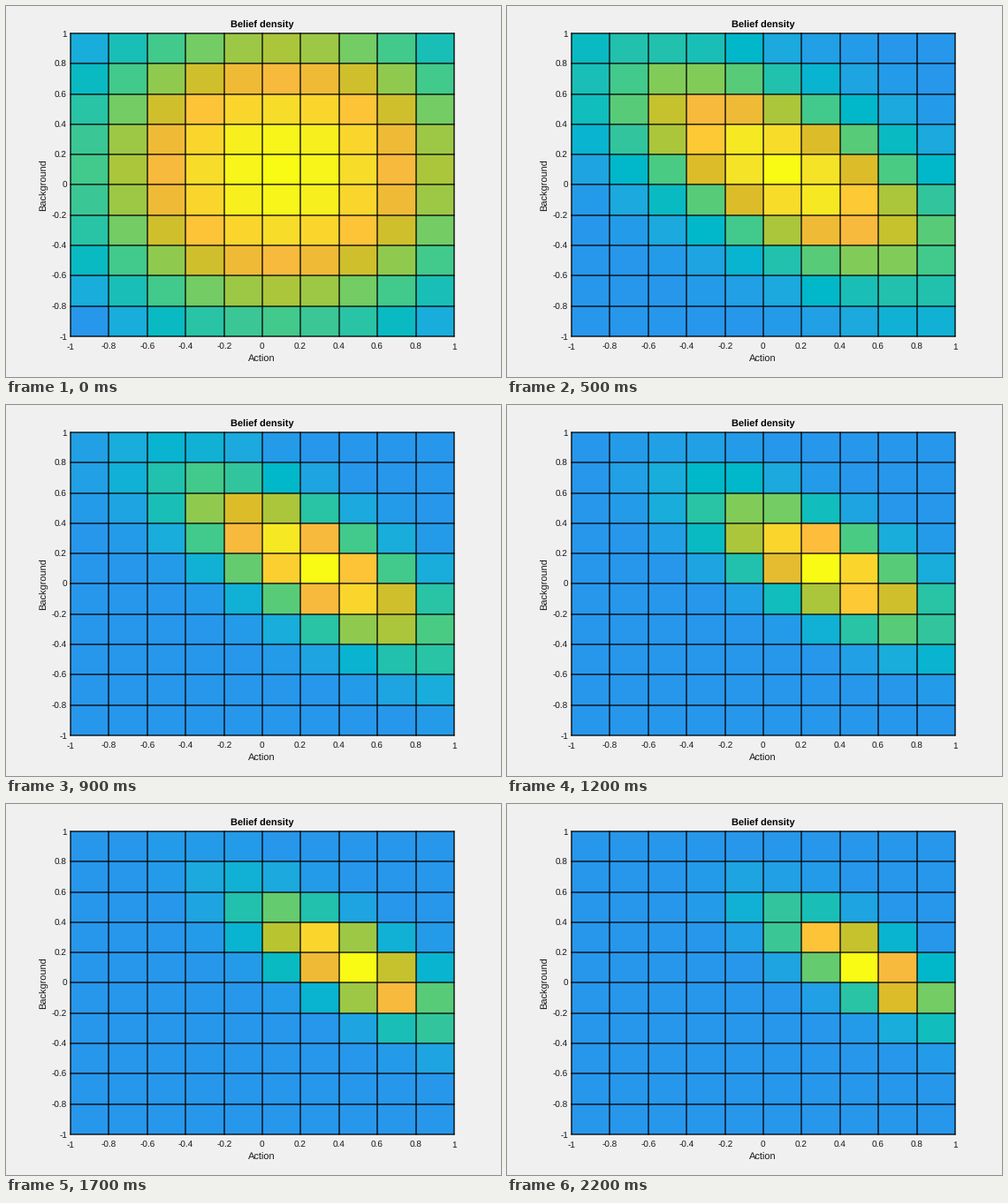
These frames come from a looping animation (560 px wide and 420 px high, 2.3 s). A matplotlib script:

```python
import numpy as np
import matplotlib.pyplot as plt
from matplotlib.animation import FuncAnimation
from matplotlib.colors import LinearSegmentedColormap

W, H, DPI = 560, 420, 100
STEP_MS, HOLD, TRIALS = 100, 3, 20
FRAMES = HOLD + TRIALS

# running totals: trials, trials with the action, outcomes among those
N_KEYS = [0, 1, 3, 7, 12, 15, 20]
ACT_KEYS = [0, 1, 2, 5, 7, 10, 13]
WIN_KEYS = [0, 0, 0, 1, 2, 4, 6]

# 43 colour steps between a few stops
SHADES = 43
STOPS = {
    0: "#2797eb", 5: "#18addb", 8: "#01b8ca", 11: "#19bfb6", 17: "#4acb84",
    21: "#81cc59", 25: "#b9c431", 28: "#dcbd29", 31: "#f8ba3d",
    32: "#febe3c", 35: "#fccf30", 38: "#f5e327", 42: "#f9fb15",
}
CMAP = LinearSegmentedColormap.from_list(
    "belief", [(k / (SHADES - 1), c) for k, c in STOPS.items()], N=SHADES)

TICKS = np.linspace(-1, 1, 11)
ACT, BACK = np.meshgrid(TICKS, TICKS)


def shades(n):
    """Colour step of every cell: Gaussian posterior after n trials."""
    acts = np.interp(n, N_KEYS, ACT_KEYS)
    wins = np.interp(n, N_KEYS, WIN_KEYS)
    both = ACT + BACK
    cost = ((ACT**2 + BACK**2) / 2 + acts * both**2 - 2 * wins * both
            + (n - acts) * BACK**2)
    p = np.exp(cost.min() - cost)
    p = (p - p.min()) / (p.max() - p.min())
    idx = np.floor(64 * (1 + 2 * p) / 3 + 1e-9) - 21
    return np.clip(idx, 0, SHADES - 1)[:-1, :-1]


plt.rcParams["font.family"] = "Liberation Sans"
plt.rcParams["text.hinting"] = "none"
fig = plt.figure(figsize=(W / DPI, H / DPI), dpi=DPI, facecolor="#f0f0f0")
ax = fig.add_axes([0, 0, 1, 1])
ax.set_xlim(0, W)
ax.set_ylim(H, 0)
ax.axis("off")


def px(v):
    return v * 72 / DPI


def label(x, y, s, size=10, color="#151515", **kw):
    kw = {"ha": "center", "va": "baseline"} | kw
    ax.text(x, y, s, fontsize=px(size), color=color, **kw)


gx = np.round(np.linspace(73, 507, 11))
gy = np.round(np.linspace(374, 31, 11))

mesh = ax.pcolormesh(gx, gy, shades(0), cmap=CMAP, vmin=-0.5,
                     vmax=SHADES - 0.5, antialiased=False)
# grid lines straddle two pixels, so no snapping
line = dict(colors="black", lw=px(1.3), snap=False)
ax.vlines(gx, gy[-1] - 0.5, gy[0] + 0.5, **line)
ax.hlines(gy, gx[0] - 0.5, gx[-1] + 0.5, **line)

for t, x, y in zip(TICKS, gx, gy):
    s = f"{round(t, 1) + 0:g}"
    label(x - 0.3, 388.8, s)
    label(69, y + 4, s, ha="right")

label(290, 25, "Belief density", 11, "black", weight="bold")
label(289.7, 403, "Action", 11)
label(47.6, 202.3, "Background", 11, rotation=90, ha="right", va="center")


def draw(k):
    mesh.set_array(shades(max(0, k - HOLD + 1)))
    return [mesh]


anim = FuncAnimation(fig, draw, frames=FRAMES, interval=STEP_MS,
                     repeat=True, repeat_delay=0)
plt.show()
```
